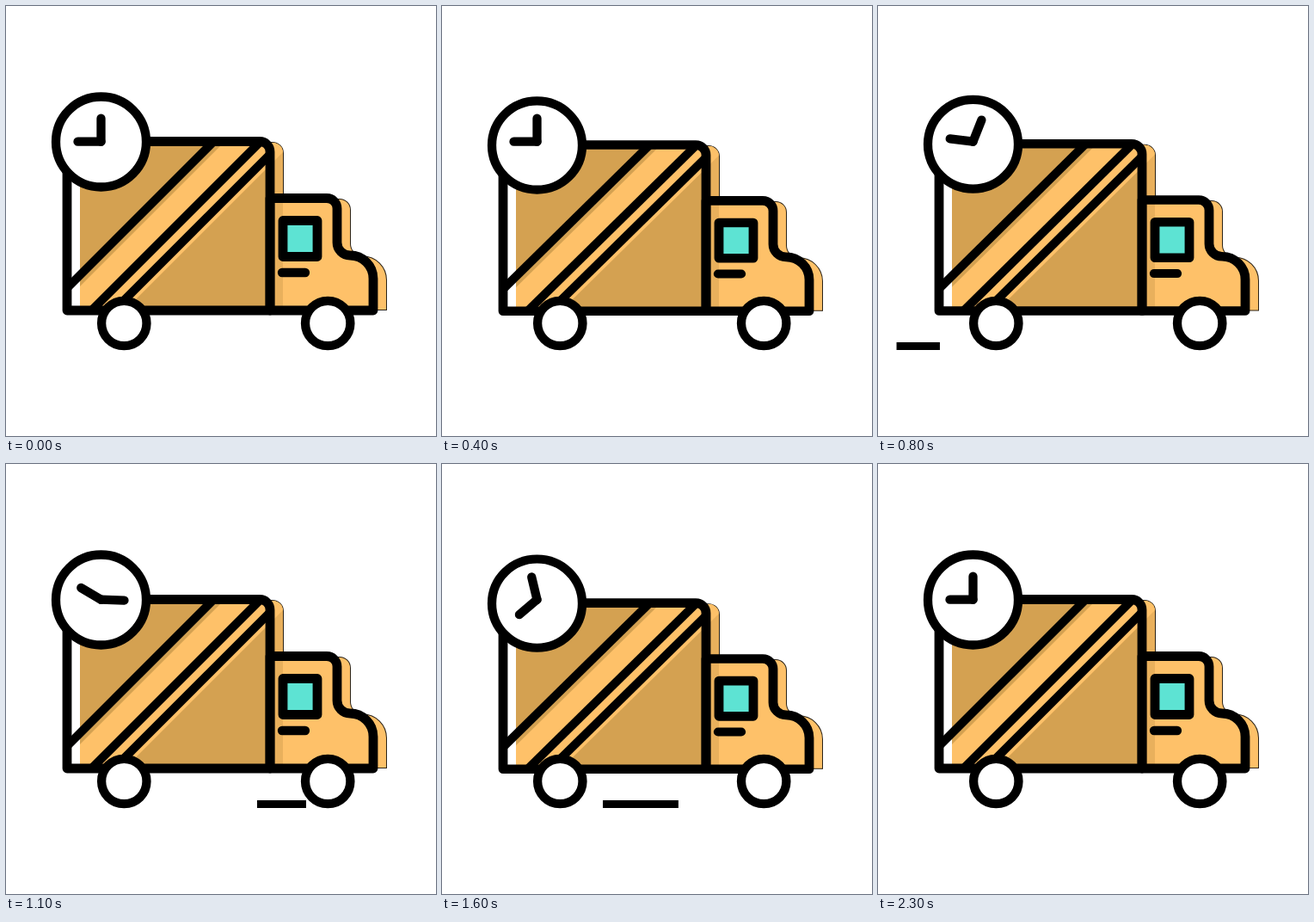
An HTML page with a canvas that plays this animation: 500 px wide and 500 px high, repeating every 2.4 s.

```html
<!DOCTYPE html>
<html lang="en">
<head>
<meta charset="utf-8">
<title>Delivery truck</title>
<style>
html, body { margin: 0; width: 100%; height: 100%; overflow: hidden; background: #fff; }
canvas { display: block; }
</style>
</head>
<body>
<canvas id="stage" width="500" height="500"></canvas>
<script>
const ctx = document.getElementById('stage').getContext('2d');
const LOOP = 2400, STEP = 100;
const INK = '#000', RIM = '#2b2318';
const LIGHT = '#fec169', DARK = '#d4a151', EDGE = '#e9b05c', TEAL = '#5de3d3';
const SHIFT = 15, GROUND = 400, BOLD = 10.8;

const ease = (t, from, to) => {
  const s = Math.min(1, Math.max(0, (t - from) / (to - from)));
  return s * s * (3 - 2 * s);
};

const box = new Path2D('M71 157.5H295A12 12 0 0 1 307 169.5V354H71Z');
const cab = new Path2D(
  'M307 223.5H373A12 12 0 0 1 385 235.5V275A15 15 0 0 0 400 290A27 27 0 0 1 427 317V354H307Z');

function line(x1, y1, x2, y2, width) {
  ctx.lineWidth = width;
  ctx.beginPath();
  ctx.moveTo(x1, y1);
  ctx.lineTo(x2, y2);
  ctx.stroke();
}

function ring(x, y, r) {
  ctx.lineWidth = 10.3;
  ctx.beginPath();
  ctx.arc(x, y, r, 0, Math.PI * 2);
  ctx.fillStyle = '#fff';
  ctx.fill();
  ctx.stroke();
}

// Band between the diagonals x + y = a and x + y = b
function band(a, b) {
  ctx.beginPath();
  ctx.moveTo(a - 100, 100);
  ctx.lineTo(b - 100, 100);
  ctx.lineTo(b - 400, 400);
  ctx.lineTo(a - 400, 400);
  ctx.fill();
}

// Offset colour layer with a hairline along its right side
function paint() {
  ctx.save();
  ctx.beginPath();
  ctx.rect(0, 0, 500, 353.5);
  ctx.clip();
  ctx.translate(SHIFT, 1.5);

  ctx.save();
  ctx.beginPath();
  ctx.rect(292, 0, 200, 400);
  ctx.clip();
  ctx.lineWidth = 2;
  ctx.strokeStyle = RIM;
  ctx.stroke(box);
  ctx.stroke(cab);
  ctx.restore();

  ctx.fillStyle = LIGHT;
  ctx.fill(cab);
  ctx.fillStyle = DARK;
  ctx.fill(box);
  ctx.clip(box);
  ctx.translate(-SHIFT, -1.5);
  ctx.fillStyle = EDGE;
  ctx.fillRect(307, 150, 17, 210);
  ctx.fillStyle = LIGHT;
  band(412, 492);
  ctx.restore();

  ctx.fillStyle = RIM;
  ctx.fillRect(427, 353, 16, 1);
}

function body() {
  paint();
  ctx.lineWidth = BOLD;
  ctx.stroke(cab);
  ctx.save();
  ctx.clip(box);
  ctx.lineCap = 'butt';
  for (const sum of [399, 453.5, 479.5]) line(sum - 140, 140, sum - 370, 370, 10);
  ctx.restore();
  ctx.lineWidth = BOLD;
  ctx.stroke(box);

  ctx.fillStyle = TEAL;
  ctx.fillRect(322, 249.5, 40, 42);
  ctx.strokeRect(322, 249.5, 40, 42);
  line(321, 310, 348, 310, 10.3);
  ring(110.5, 158, 52.5);
}

function hand(degrees) {
  const a = degrees * Math.PI / 180;
  line(110.5, 157.7, 110.5 + 27 * Math.sin(a), 157.7 - 27 * Math.cos(a), 10.3);
}

function road(right, left, head, tail) {
  const x1 = right + (left - right) * head;
  const x2 = right + (left - right) * tail;
  ctx.fillStyle = INK;
  ctx.fillRect(x1, 391, x2 - x1, 9);
}

function squash(t) {
  if (t >= 1900) return 0;
  const phase = t < 1100 ? t / 1100 : (t - 1100) / 800;
  return 0.02 * Math.sin(Math.PI * phase) ** 2;
}

function draw(t) {
  ctx.fillStyle = '#fff';
  ctx.fillRect(0, 0, 500, 500);
  ctx.strokeStyle = INK;
  ctx.lineCap = ctx.lineJoin = 'round';

  road(97, 4, ease(t, 475, 925), ease(t, 650, 1090));
  road(349, 187, ease(t, 860, 1460), ease(t, 1310, 1925));

  ctx.save();
  ctx.translate(0, GROUND);
  ctx.scale(1, 1 - squash(t));
  ctx.translate(0, -GROUND);
  body();
  ctx.restore();

  const turn = ease(t, 562, 1935);
  hand(270 * turn);
  hand(270 + 90 * turn);
  ring(137.3, 369, 26.2);
  ring(374.2, 369, 26.2);
}

const start = performance.now();
function tick() {
  const t = (performance.now() - start) % LOOP;
  draw(Math.floor(t / STEP) * STEP);
  requestAnimationFrame(tick);
}
tick();
</script>
</body>
</html>
```
